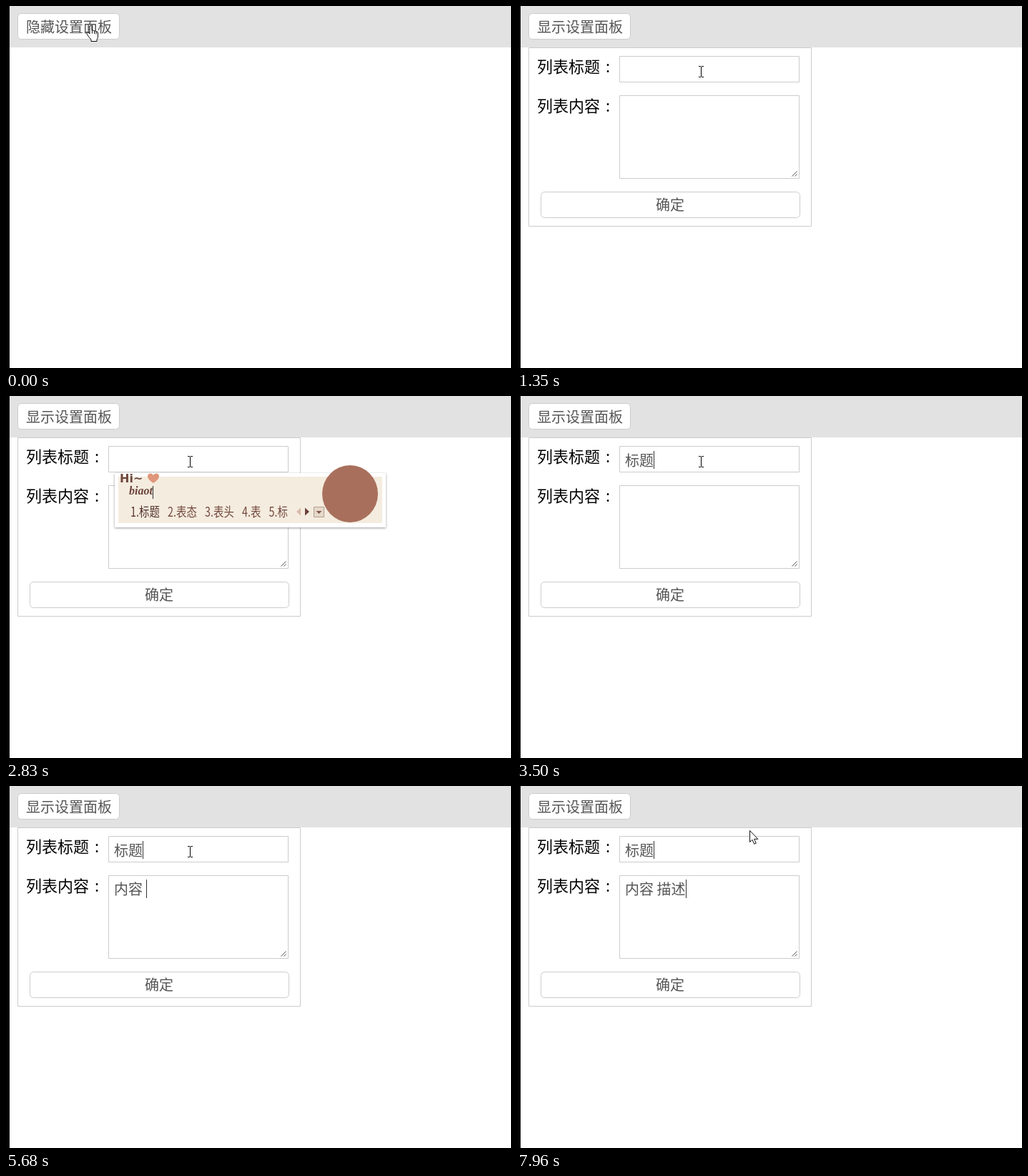
An HTML page with a canvas that plays this animation: 706 by 507 pixels, repeating every 8000 ms.

```html
<!DOCTYPE html>
<html lang="zh-CN">
<head>
<meta charset="utf-8">
<title>设置面板</title>
<style>
html, body { margin: 0; width: 100%; height: 100%; overflow: hidden; background: #fff; }
canvas { display: block; }
</style>
</head>
<body>
<canvas id="stage" width="706" height="507"></canvas>
<script>
const ctx = document.getElementById('stage').getContext('2d');
const LOOP = 8000;
const SANS = '"Noto Sans CJK SC", "Noto Sans CJK", sans-serif';
const SERIF = '"Liberation Serif", serif';

// time, cursor kind, x, y
const cursorSteps = [
  [0, 'hand', 112, 26], [320, ''], [660, 'hand', 122, 36], [737, 'hand', 126, 44],
  [813, 'hand', 130, 49], [890, 'arrow', 165, 60], [967, 'arrow', 205, 74],
  [1043, 'beam', 232, 84], [1120, 'beam', 250, 92], [1197, 'beam', 257, 92],
  [7640, 'beam', 280, 86], [7715, 'arrow', 312, 72], [7790, 'arrow', 325, 64],
  [7960, 'arrow', 325, 62]
];

// time, typed pinyin, candidates, popup width; a lone time closes the popup
const imeSteps = [
  [0],
  [2380, 'b', '吧|不|把|<(￣ 3 ￣)>  表!|班', 419],
  [2430, 'bi', '比|笔|必|毕|闭', 338],
  [2600, 'bia', '表|标|别啊|比啊|表示一下吧', 436],
  [2670, 'biao', '表|标|彪|表达|表示一下吧', 420],
  [2830, 'biaot', '标题|表态|表头|表|标', 381],
  [2920, 'biaoti', '标题|表|标|彪|飙', 354],
  [3500],
  [5140, 'n', '你|呢|那|能|你好呀!', 381],
  [5290, 'ne', '呢|那儿|哪儿|讷|呢喃着', 408],
  [5380, 'nei', '内|那|馁|哪|内', 344],
  [5530, 'neir', '内容|内人|内燃|内热|内入', 408],
  [5605, 'neirong', '内容|内|那|馁|哪', 352],
  [5680],
  [6250, 'm', '吗|没|嘛|们|没有问题', 394],
  [6710, 'mi', '米|密|迷|秘|米', 344],
  [6780, 'mia', '米啊|密啊|米|迷|喵啊', 394],
  [6930, 'miao', '秒|描|苗|妙|″', 327],
  [7010, 'miaos', '描述|秒杀|描|妙手|秒速', 417],
  [7095, 'miaosh', '描述|描|秒|苗|妙', 352],
  [7180]
];

const latest = (steps, t) => steps.filter(step => step[0] <= t).pop();

function text(str, x, y, size, color, family = SANS, style = '350') {
  ctx.font = `${style} ${size}px ${family}`;
  ctx.fillStyle = color;
  ctx.fillText(str, x, y);
  return ctx.measureText(str).width;
}

function fill(x, y, w, h, color) {
  ctx.fillStyle = color;
  ctx.fillRect(x, y, w, h);
}

function box(x, y, w, h, radius = 0) {
  ctx.beginPath();
  ctx.roundRect(x + .5, y + .5, w - 1, h - 1, radius);
  ctx.fillStyle = '#fff';
  ctx.fill();
  ctx.strokeStyle = '#ccc';
  ctx.stroke();
}

function shape(d, x, y, fillColor, strokeColor) {
  ctx.save();
  ctx.translate(x, y);
  const path = new Path2D(d);
  ctx.fillStyle = fillColor;
  ctx.fill(path);
  if (strokeColor) {
    ctx.strokeStyle = strokeColor;
    ctx.stroke(path);
  }
  ctx.restore();
}

function drawToolbar(t) {
  fill(0, 0, 706, 58, '#e2e2e2');
  fill(0, 0, 5, 507, '#000');
  box(16, 10, 143, 37, 5);
  text(t < 510 ? '隐藏设置面板' : '显示设置面板', 28, 37, 20, '#555');
}

// Slide-down with a small overshoot, seen at a coarse frame rate
function panelScale(t) {
  const frame = (1350 - 660) / 9;
  const seen = 660 + Math.floor((t - 660) / frame + 1e-6) * frame;
  const u = Math.min(1, (seen - 593) / 550) - 1;
  return 1 + 2.33 * u ** 3 + 1.33 * u * u;
}

function label(str, y) {
  text(str, 28, y, 22, '#000');
  text(':', 124, y, 22, '#000');
}

function drawPanel(t) {
  if (t < 660) return;
  const scale = panelScale(t);
  const height = Math.round(251 * scale);
  const shift = k => Math.max(-11, Math.round((scale - 1) * k));
  const dy = shift(40);

  ctx.save();
  box(16, 58, 396, height);
  ctx.beginPath();
  ctx.rect(17, 59, 394, height - 2);
  ctx.clip();
  label('列表标题', 93 + dy);
  label('列表内容', 148 + dy);
  box(143, 70 + dy, 252, 37);
  box(143, 125 + dy, 252, 117);
  shape('M384.5 238.5L391.5 231.5M388.5 238.5L391.5 235.5', 0, dy, '#fff', '#555');
  const buttonShift = shift(60);
  box(33, 260 + buttonShift, 363, 37, 5);
  text('确定', 194, 286 + buttonShift, 20, '#555');
  ctx.restore();

  if (t >= 3500) {
    text('标题', 151, 98, 20, '#555');
    fill(191, 77, 1, 25, '#333');
  }
  if (t >= 5680) text(t < 7180 ? '内容' : '内容 描述', 151, 152, 20, '#555');
  const caretX = t < 5680 ? 151 : t < 7180 ? 196 : 236;
  if (t >= 5290 && !(t >= 6250 && t < 6710)) fill(caretX, 131, 1, 26, '#333');
}

function drawIme(t) {
  const [, pinyin, candidates, width] = latest(imeSteps, t);
  if (!pinyin) return;
  ctx.save();
  ctx.translate(t < 5140 ? 151 : t < 5680 ? 150 : 197, t < 5140 ? 107 : 169);

  ctx.save();
  ctx.shadowColor = 'rgba(0,0,0,.4)';
  ctx.shadowBlur = 3;
  ctx.shadowOffsetY = 1;
  fill(1, 1, width - 2, 76, '#fff');
  ctx.restore();
  fill(6, 6, width - 12, 65, '#f4ecdf');

  text('Hi~', 8, 14, 16, '#6f483e', '"DejaVu Sans", sans-serif', 'bold');
  shape('M8 14C2 10 0 7 0 4C0 0 6-1 8 3C10-1 16 0 16 4C16 7 14 10 8 14Z', 47, 1, '#df967a');

  const typed = text(pinyin, 21, 31, 16, '#6b4239', SERIF, 'italic bold');
  fill(Math.round(21 + typed), 19, 1, 18, '#333');

  ctx.save();
  ctx.translate(23, 62);
  ctx.scale(.8, 1); // condensed face
  let x = 0;
  candidates.split('|').forEach((word, i) => {
    x += text(`${i + 1}.${word}`, x, 0, 18, i ? '#74493e' : '#56352c') + 14;
  });
  ctx.restore();

  const arrows = width - 126;
  shape('M6 0V11L0 5.5Z', arrows, 49.5, '#d9b9a9');
  shape('M0 0V11L6 5.5Z', arrows + 12, 49.5, '#6b4239');
  shape('M.5.5H14.5V14.5H.5Z', arrows + 24, 48, '#e6d9ca', '#b49d91');
  shape('M0 0H8L4 4Z', arrows + 27.5, 54, '#80564b');

  ctx.beginPath();
  ctx.ellipse(width - 51, 30, 39, 40, 0, 0, Math.PI * 2);
  ctx.fillStyle = '#a8705c';
  ctx.fill();
  ctx.restore();
}

function drawCursor(t) {
  const [, kind, x, y] = latest(cursorSteps, t);
  if (kind === 'hand') {
    shape('M5 13V3Q5 1 6.5 1Q8 1 8 3V8Q10 7 11 9Q13 8 14 10Q16.5 9 16.5 12V17Q16 20 15 21V23.5H7V21Q3 17 1 13Q0 10 3 11Z',
      x, y, '#fff', '#111');
    shape('M8.5 8V12.5M11.5 9V13M14 10V13.5', x, y, '#fff', '#111');
  } else if (kind === 'arrow') {
    shape('M.5.5V16.5L4 13.3L6.7 19.3L9.3 18.2L6.6 12.3H11.8Z', x, y, '#fff', '#111');
  } else if (kind === 'beam') {
    fill(x, y - 7, 1, 14, '#000');
    for (const end of [y - 8, y + 7]) {
      fill(x - 3, end, 3, 1, '#000');
      fill(x + 1, end, 3, 1, '#000');
    }
  }
}

function draw(t) {
  fill(0, 0, 706, 507, '#fff');
  drawToolbar(t);
  drawPanel(t);
  drawIme(t);
  drawCursor(t);
}

const start = performance.now();
function tick() {
  draw((performance.now() - start) % LOOP);
  requestAnimationFrame(tick);
}
tick();
</script>
</body>
</html>
```
